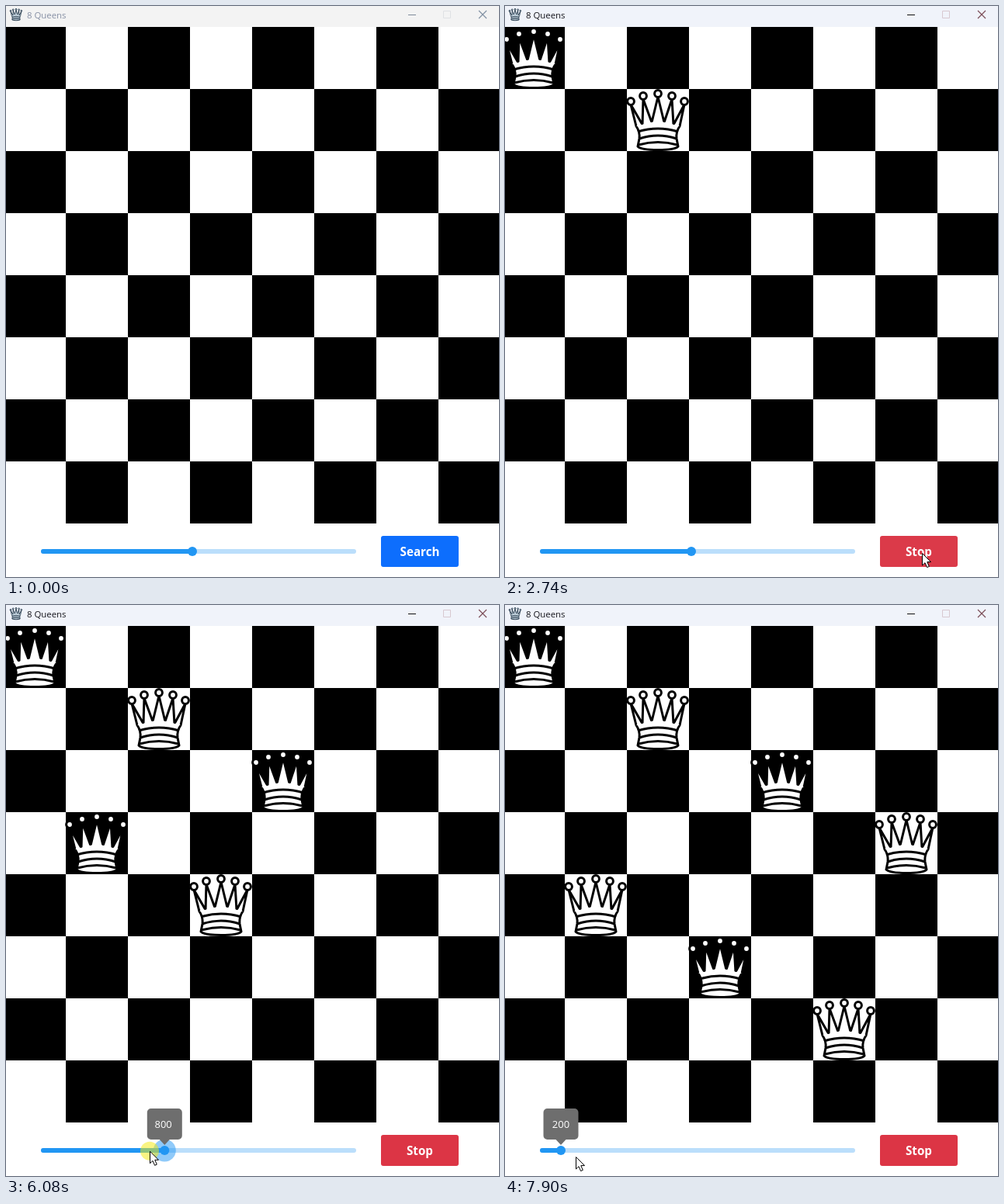
An HTML page without scripts that plays this animation: 635x736 px, repeating every 8000 ms.

```html
<!DOCTYPE html>
<html lang="en">
<head>
<meta charset="utf-8">
<title>8 Queens</title>
<style>
  html, body { margin: 0; width: 100%; height: 100%; overflow: hidden; background: #fff; }
  svg { display: block; }
  text { font-family: "Open Sans", "Noto Sans", sans-serif; }
  .queen { fill: #fff; stroke: #000; stroke-width: 3; stroke-linejoin: round; }
  .btn { font-size: 15.2px; font-weight: 700; fill: #fff; text-anchor: middle; }
  .tip { font-size: 13px; fill: #fff; text-anchor: middle; }
</style>
</head>
<body>
<svg width="635" height="736" viewBox="0 0 635 736">
  <defs>
    <pattern id="board" x="-3" y="27" width="160" height="160" patternUnits="userSpaceOnUse">
      <path d="M0 0h80v80h80v80h-80v-80h-80z" shape-rendering="crispEdges"/>
    </pattern>
    <g id="queen">
      <path d="M5 20 20 46 21 13 32 43 40 10 48 43 58 13 60 46 74 20 68 48Q63 55 64 64L66 74Q62 78.5 40 78.5T14 74L16 64Q17 55 12 48Z"/>
      <path d="M12 48Q16 45 20 46 26 42 32 43 40 39 48 43 54 42 60 46 64 45 68 48" stroke="none"/>
      <path d="M14 55Q40 47 66 55M16 64Q40 56 64 64M15 72Q40 65 65 72" fill="none"/>
      <circle cx="5" cy="16" r="4.4"/>
      <circle cx="21" cy="9" r="4.4"/>
      <circle cx="40" cy="6" r="4.4"/>
      <circle cx="58" cy="9" r="4.4"/>
      <circle cx="74" cy="16" r="4.4"/>
    </g>
    <clipPath id="btnClip"><rect x="483" y="683" width="100" height="40" rx="3"/></clipPath>
    <clipPath id="tipClip"><rect x="-22" y="655" width="44" height="28"/></clipPath>
  </defs>

  <!-- title bar -->
  <rect width="635" height="27" fill="#f3f3f3">
    <animate attributeName="fill" calcMode="discrete" values="#f3f3f3;#f0f3fa" keyTimes="0;.2" dur="8s" repeatCount="indefinite"/>
  </rect>
  <use href="#queen" class="queen" transform="translate(5 3) scale(.2)" style="stroke:#24384a;stroke-width:4.5;fill:#d5e4ee"/>
  <text x="27" y="16" font-size="11.4" fill="#8790a5">8 Queens
    <animate attributeName="fill" calcMode="discrete" values="#8790a5;#16161c" keyTimes="0;.2" dur="8s" repeatCount="indefinite"/>
  </text>
  <g fill="none" stroke-width="1">
    <path d="M518 11.5h10" stroke="#7f8b9b">
      <animate attributeName="stroke" calcMode="discrete" values="#7f8b9b;#111" keyTimes="0;.2" dur="8s" repeatCount="indefinite"/>
    </path>
    <path d="M563.5 6.5h9v9h-9z" stroke="#dfe1e4">
      <animate attributeName="stroke" calcMode="discrete" values="#dfe1e4;#d8c8d0" keyTimes="0;.2" dur="8s" repeatCount="indefinite"/>
    </path>
    <path d="M609 6l10 10m0-10l-10 10" stroke="#8090a3" stroke-width="1.2">
      <animate attributeName="stroke" calcMode="discrete" values="#8090a3;#7b4d58" keyTimes="0;.2" dur="8s" repeatCount="indefinite"/>
    </path>
  </g>

  <rect y="27" width="635" height="640" fill="url(#board)"/>

  <!-- queens, placed by the backtracking search -->
  <g class="queen" transform="translate(-3 27)">
    <use href="#queen" visibility="hidden">
      <animate attributeName="visibility" calcMode="discrete" values="hidden;visible" keyTimes="0;.2025" dur="8s" repeatCount="indefinite"/>
    </use>
    <use href="#queen" x="160" y="80" visibility="hidden">
      <animate attributeName="visibility" calcMode="discrete" values="hidden;visible" keyTimes="0;.3348" dur="8s" repeatCount="indefinite"/>
    </use>
    <use href="#queen" x="320" y="160" visibility="hidden">
      <animate attributeName="visibility" calcMode="discrete" values="hidden;visible" keyTimes="0;.4672" dur="8s" repeatCount="indefinite"/>
    </use>
    <use href="#queen" x="80" y="240" visibility="hidden">
      <animate attributeName="visibility" calcMode="discrete" values="hidden;visible;hidden" keyTimes="0;.5998;.8935" dur="8s" repeatCount="indefinite"/>
    </use>
    <use href="#queen" x="240" y="320" visibility="hidden">
      <animate attributeName="visibility" calcMode="discrete" values="hidden;visible;hidden" keyTimes="0;.7322;.851" dur="8s" repeatCount="indefinite"/>
    </use>
    <use href="#queen" x="560" y="320" visibility="hidden">
      <animate attributeName="visibility" calcMode="discrete" values="hidden;visible;hidden" keyTimes="0;.851;.8935" dur="8s" repeatCount="indefinite"/>
    </use>
    <use href="#queen" x="480" y="240" visibility="hidden">
      <animate attributeName="visibility" calcMode="discrete" values="hidden;visible" keyTimes="0;.8935" dur="8s" repeatCount="indefinite"/>
    </use>
    <use href="#queen" x="80" y="320" visibility="hidden">
      <animate attributeName="visibility" calcMode="discrete" values="hidden;visible" keyTimes="0;.925" dur="8s" repeatCount="indefinite"/>
    </use>
    <use href="#queen" x="240" y="400" visibility="hidden">
      <animate attributeName="visibility" calcMode="discrete" values="hidden;visible" keyTimes="0;.956" dur="8s" repeatCount="indefinite"/>
    </use>
    <use href="#queen" x="400" y="480" visibility="hidden">
      <animate attributeName="visibility" calcMode="discrete" values="hidden;visible" keyTimes="0;.987" dur="8s" repeatCount="indefinite"/>
    </use>
  </g>

  <!-- button with click ripple -->
  <rect x="483" y="683" width="100" height="40" rx="3" fill="#0d6efd">
    <animate attributeName="fill" calcMode="discrete" values="#0d6efd;#dc3545" keyTimes="0;.2025" dur="8s" repeatCount="indefinite"/>
  </rect>
  <g clip-path="url(#btnClip)">
    <circle cx="537" cy="705" r="0" fill="#bcb5b5" opacity="0">
      <animate attributeName="r" values="0;0;62;62" keyTimes="0;.2;.236;1" dur="8s" repeatCount="indefinite"/>
      <animate attributeName="opacity" values="0;0;.5;.5;0;0" keyTimes="0;.2;.201;.2425;.351;1" dur="8s" repeatCount="indefinite"/>
    </circle>
  </g>
  <text class="btn" x="533" y="709">Search
    <animate attributeName="visibility" calcMode="discrete" values="visible;hidden" keyTimes="0;.2025" dur="8s" repeatCount="indefinite"/>
  </text>
  <text class="btn" x="533" y="709" visibility="hidden">Stop
    <animate attributeName="visibility" calcMode="discrete" values="hidden;visible" keyTimes="0;.2025" dur="8s" repeatCount="indefinite"/>
  </text>

  <!-- delay slider -->
  <g stroke-width="6" stroke-linecap="round">
    <path d="M48 703H448" stroke="#bbdefb"/>
    <line x1="48" y1="703" x2="240" y2="703" stroke="#2196f3">
      <animate attributeName="x2" values="240;240;215;178;151;113;95;93;72;72" keyTimes="0;.7175;.75;.785;.81875;.8625;.88625;.9;.925;1" dur="8s" repeatCount="indefinite"/>
    </line>
  </g>
  <g transform="translate(240 0)">
    <animateTransform attributeName="transform" type="translate" values="240;240;215;178;151;113;95;93;72;72" keyTimes="0;.7175;.75;.785;.81875;.8625;.88625;.9;.925;1" dur="8s" repeatCount="indefinite"/>
    <circle cy="703" r="14.5" fill="#2196f3" opacity="0">
      <animate attributeName="opacity" values="0;0;.5;.5;0;0" keyTimes="0;.6425;.6675;.93;.957;1" dur="8s" repeatCount="indefinite"/>
    </circle>
    <circle cy="703" r="6" fill="#2196f3"/>
    <g opacity="0">
      <animate attributeName="opacity" values="0;0;.03;1;1" keyTimes="0;.695;.70125;.72;1" dur="8s" repeatCount="indefinite"/>
      <path d="M-17.5 649h35a5 5 0 0 1 5 5v30a5 5 0 0 1-5 5h-11L0 696l-6.5-7h-11a5 5 0 0 1-5-5v-30a5 5 0 0 1 5-5z" fill="#6e6e6e"/>
      <g clip-path="url(#tipClip)">
        <text class="tip" y="674">
          <tspan x="0">1000</tspan>
          <tspan x="0" dy="40">900</tspan>
          <tspan x="0" dy="40">800</tspan>
          <tspan x="0" dy="40">700</tspan>
          <tspan x="0" dy="40">600</tspan>
          <tspan x="0" dy="40">500</tspan>
          <tspan x="0" dy="40">400</tspan>
          <tspan x="0" dy="40">300</tspan>
          <tspan x="0" dy="40">200</tspan>
          <animateTransform attributeName="transform" type="translate" calcMode="discrete" values="0 0;0 -40;0 -80;0 -120;0 -160;0 -200;0 -240;0 -280;0 -320" keyTimes="0;.732;.747;.762;.782;.807;.84;.868;.902" dur="8s" repeatCount="indefinite"/>
        </text>
      </g>
    </g>
  </g>

  <!-- mouse pointer -->
  <g transform="translate(660 722)">
    <animateTransform attributeName="transform" type="translate"
      values="660 722;660 722;630 718;612 700;595 690;553 711;553 711;537 705;537 705;525 738;240 760;240 760;240 711;236 705;236 705;196 704;158 703;121 700;83 702;78 703;78 703;91 711;91 711"
      keyTimes="0;.0315;.0325;.0575;.075;.11625;.142;.175;.4175;.4425;.45;.6415;.6425;.6675;.705;.75;.785;.81875;.88625;.9125;.945;.985;1"
      dur="8s" repeatCount="indefinite"/>
    <circle r="12" fill="#f3ea10" opacity=".52" visibility="hidden">
      <animate attributeName="visibility" calcMode="discrete" values="hidden;visible;hidden;visible;hidden" keyTimes="0;.2;.2175;.6925;.948" dur="8s" repeatCount="indefinite"/>
    </circle>
    <path d="M.5 .5V16L4 12.7 6.6 18.6 9.3 17.4 6.8 11.6H11.5Z" fill="#fff" stroke="#000" stroke-width="1"/>
  </g>
</svg>
</body>
</html>
```
